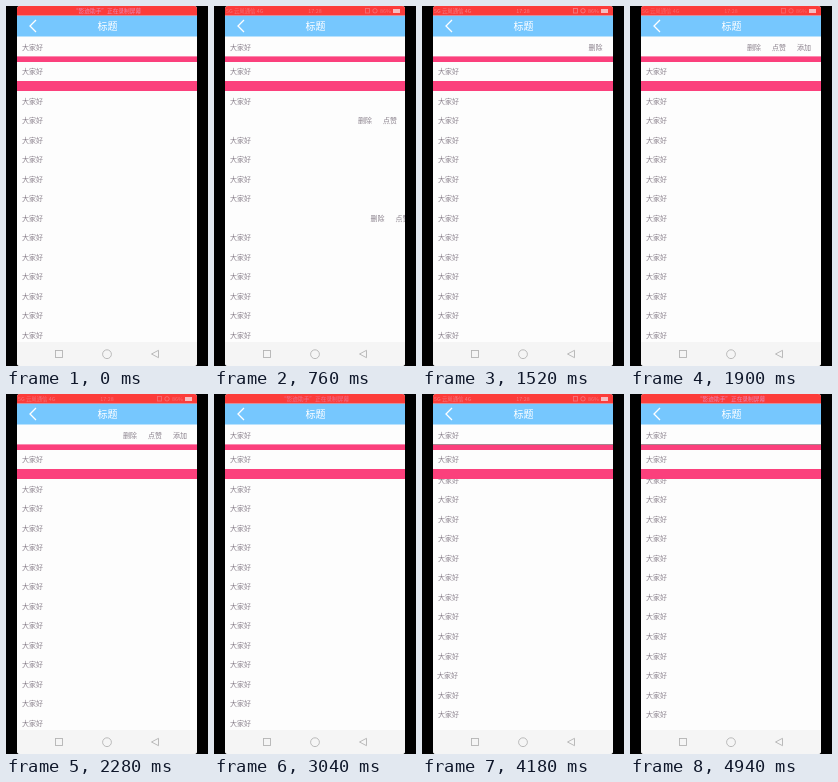
Recreate the animation shown at these times as an HTML page with a canvas. Size 202x360 px, loop 5.32 s.

```html
<!DOCTYPE html>
<html lang="zh-CN">
<head>
<meta charset="utf-8">
<title>标题</title>
<style>
html, body { margin: 0; width: 100%; height: 100%; overflow: hidden; background: #000; }
canvas { display: block; width: 202px; height: 360px; }
</style>
</head>
<body>
<canvas id="stage" width="202" height="360"></canvas>
<script>
const ctx = document.getElementById('stage').getContext('2d');
const STEP = 380, COUNT = 14;
const LEFT = 11, RIGHT = 191, PITCH = 19.52, CELL = 25;
const PINK = '#fb407c', INK = '#8a818c';
const ACTIONS = ['删除', '点赞', '添加'];

// swipe distance by step; steps not listed are closed
const topSwipe = { 4: 30, 5: 79.5, 6: 79.5 };
const listSwipe = {
  1: { 1: 52, 2: 52.5, 3: 52.5 },
  6: { 2: 40, 3: 76.3 },
  10: { 11: 1, 12: 52 }
};
// the recording notice alternates with the normal status icons
const notice = { 0: 0.75, 1: 0.4, 7: 0.35, 8: 0.5, 12: 0.45, 13: 0.75 };
const icons = { 3: 0.55, 4: 0.5, 5: 0.32, 9: 0.32, 11: 0.45 };

function box(x, y, w, h, color) {
  ctx.fillStyle = color;
  ctx.fillRect(x, y, w, h);
}

function label(str, x, y, size, color, align = 'left', weight = 400) {
  ctx.font = `${weight} ${size}px "Noto Sans CJK SC", "Noto Sans CJK", sans-serif`;
  ctx.textAlign = align;
  ctx.textBaseline = 'middle';
  ctx.fillStyle = color;
  ctx.fillText(str, x, y);
}

function line(points, color, width, close) {
  ctx.beginPath();
  points.forEach(([x, y]) => ctx.lineTo(x, y));
  if (close) ctx.closePath();
  ctx.strokeStyle = color;
  ctx.lineWidth = width;
  ctx.stroke();
}

function row(y, swipe, actions) {
  label('大家好', 16 - swipe, y, 7, INK);
  if (!swipe) return;
  for (let i = 0; i < actions; i++) {
    label(ACTIONS[i], RIGHT - swipe + CELL * (i + 0.5), y, 7, INK, 'center');
  }
}

function statusBar(step) {
  box(LEFT, 0, 180, 9.5, '#fc3c3a');
  ctx.save();
  if (notice[step]) {
    ctx.globalAlpha = notice[step];
    label('“影迹助手”正在录制屏幕', 101, 4.8, 5.7, '#e0a6e4', 'center');
  } else {
    ctx.globalAlpha = icons[step] || 0.4;
    const c = '#e9c4d4';
    label('5G 云岚通信 4G', 12, 4.8, 5.4, c);
    label('17:28', 101, 4.8, 5.4, c, 'center');
    ctx.strokeStyle = c;
    ctx.lineWidth = 0.8;
    ctx.strokeRect(151.5, 2.5, 4, 4.5);
    ctx.beginPath();
    ctx.arc(161, 4.8, 2.2, 0, Math.PI * 2);
    ctx.stroke();
    label('86%', 166, 4.8, 5.4, c);
    ctx.globalAlpha = 0.8;
    box(179, 3, 7, 4, '#f6dde2');
  }
  ctx.restore();
}

function header() {
  box(LEFT, 9.5, 180, 21, '#76c7fe');
  line([[30, 14], [24, 20], [30, 26]], '#fff', 1.3);
  label('标题', 101.5, 20, 10, '#fff', 'center', 500);
}

function navBar() {
  box(LEFT, 336, 180, 24, '#f5f5f5');
  const c = '#b4b4b4';
  ctx.strokeStyle = c;
  ctx.lineWidth = 0.9;
  ctx.strokeRect(49.5, 344.5, 7, 7);
  ctx.beginPath();
  ctx.arc(101, 348.2, 4.4, 0, Math.PI * 2);
  ctx.stroke();
  line([[145.5, 348], [152.5, 344.3], [152.5, 351.7]], c, 0.9, true);
}

function list(step) {
  const top = step >= 9 ? 86.2 : 95;
  ctx.save();
  ctx.beginPath();
  ctx.rect(LEFT, 85, 180, 251);
  ctx.clip();
  for (let i = 0; i < 13; i++) {
    const swipe = (listSwipe[i] || {})[step] || 0;
    row(top + i * PITCH, swipe, i === 6 ? 3 : 2);
  }
  ctx.restore();
}

function draw(step) {
  box(0, 0, 202, 360, '#000');
  ctx.save();
  ctx.beginPath();
  ctx.roundRect(LEFT, 0, 180, 360, 3);
  ctx.clip();
  box(LEFT, 0, 180, 360, '#fdfdfd');
  list(step);
  row(41, topSwipe[step] || 0, 3);
  row(65.3, 0, 0);
  box(LEFT, 50.4, 180, 5.6, PINK);
  if (step >= 9) box(LEFT, 50, 180, 1, '#a8848f');
  box(LEFT, 75, 180, 10, PINK);
  header();
  statusBar(step);
  navBar();
  ctx.restore();
}

const start = performance.now();
function tick() {
  const t = Math.max(0, performance.now() - start);
  draw(Math.floor(t / STEP) % COUNT);
  requestAnimationFrame(tick);
}
tick();
</script>
</body>
</html>
```
